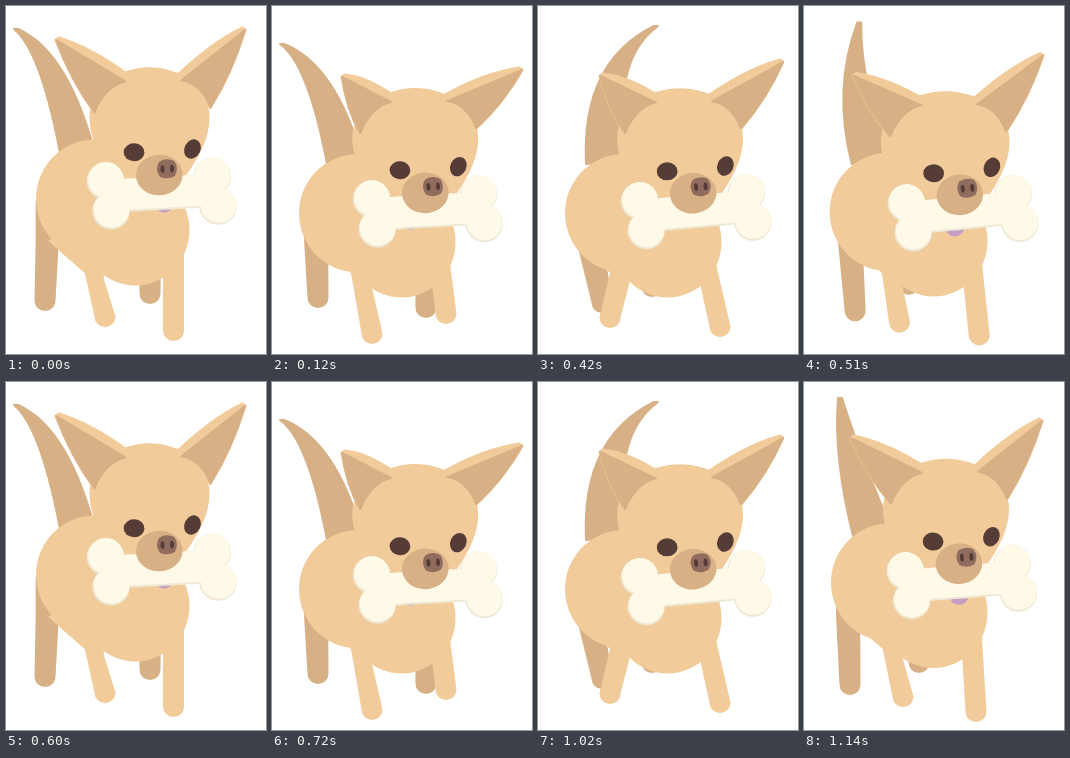
An HTML page with a canvas for the animation above (1.17 s loop, 260 by 348 pixels).

```html
<!DOCTYPE html>
<html>
<head>
<meta charset="utf-8">
<style>
  html, body { margin: 0; width: 100%; height: 100%; overflow: hidden; background: #fff; }
  canvas { display: block; }
</style>
</head>
<body>
<canvas id="stage" width="260" height="348"></canvas>
<script>
const ctx = document.getElementById('stage').getContext('2d');
const FUR = '#f1cb99', SHADE = '#d7b086', BONE = '#fff9e7', EDGE = '#efe9d7',
  EYE = '#553c37', NOSE = '#8f6c5d', TAG = '#c49fc2';
const LOOP = 1170, STEP = 30, STRIDE = 600;

// Key poses sit at these parts of a stride; a smooth periodic curve joins them.
const KEYS = [0, 0.2, 0.4, 0.7, 0.9];
let weights = [];
const setPhase = p => {
  weights = KEYS.map((a, i) => KEYS.reduce((w, b, j) =>
    i === j ? w : w * Math.sin(Math.PI * (p - b)) / Math.sin(Math.PI * (a - b)), 1));
};
const pose = (...values) => values.reduce((sum, v, i) => sum + v * weights[i], 0);

function shape(color, d, line = 0) {
  const path = new Path2D(d);
  ctx.fillStyle = ctx.strokeStyle = color;
  ctx.fill(path);
  if (line) {
    ctx.lineWidth = line;
    ctx.lineJoin = 'round';
    ctx.stroke(path);
  }
}

function oval(color, x, y, rx, ry = rx, turn = 0) {
  ctx.fillStyle = color;
  ctx.beginPath();
  ctx.ellipse(x, y, rx, ry, turn, 0, 2 * Math.PI);
  ctx.fill();
}

// Rounded foot from its left side to its right side, y being the sole.
const foot = (x, y, r = 10.5) => `${x - r} ${y - r}A${r} ${r} 0 0 0 ${x + r} ${y - r}`;

function tail() {
  const x = pose(10, 10, 80, 118, 36), y = pose(23, 38, 7, 20, 16);
  const cx = pose(49, 49, 51, 56, 42), cy = pose(46, 58, 84, 56, 76);
  const base = pose(56, 55, 47, 48, 50);
  shape(SHADE, `M${base} 158Q${cx - 13} ${cy} ${x - 2} ${y}L${x + 2} ${y}Q${cx + 15} ${cy} 91 155Z`, 2);
}

function backLegs() {
  const lx = pose(39, 46, 61, 64, 46), ly = pose(305, 302, 297, 307, 313);
  const hip = 16 + 0.35 * lx;
  shape(SHADE, `M${hip} 195V235L${foot(lx, ly)}L${hip + 24} 220Z`);
  const rx = pose(144, 154, 138, 114, 115), ry = pose(298, 312, 314, 291, 291);
  shape(SHADE, `M${rx - 11} 235L${foot(rx, ry)}L${rx + 11} 235Z`);
}

function body() {
  const y = pose(-6, 6, 0, 6, 0.5), x = pose(3, 0, 0, 0, 0);
  oval(FUR, 85 + x, 200 + y * 1.2, 58, 59);
  oval(FUR, 129.5, 230 + y, 54, 55.5);
}

function frontLegs() {
  const lx = pose(99, 100, 87, 72, 99), ly = pose(321, 338, 343, 322, 325);
  shape(FUR, `M42 235L${54 + lx / 4} 267L${foot(lx, ly)}L${78 + lx / 5} 273V200Z`);
  const rx = pose(167.5, 174, 182, 182, 172), ry = pose(335, 318, 322, 331, 340);
  shape(FUR, `M157 255L${foot(rx, ry)}L178 258V230Z`);
}

function ear(side, tx, ty, ax, ay, bx, by) {
  const outer = `M${bx} ${by}Q${(bx + tx) / 2 + side * 4} ${(by + ty) / 2 + 6} ${tx} ${ty + 3}`;
  shape(FUR, `${outer}L${tx - side * 3} ${ty + 1}Q${(ax + tx) / 2} ${(ay + ty) / 2 - 8} ${ax} ${ay}Z`, 3);
  shape(SHADE, `${outer}L${ax + side * 4} ${ay + 5}Q${(ax + bx) / 2 + side * 7} ${(ay + by) / 2 - 8} ${bx} ${by}Z`, 2);
}

function head(faceY) {
  const x = pose(143.5, 143.2, 146, 142, 142), ry = pose(57, 54, 54, 54, 54);
  const y = faceY - 26.2, top = y - ry, rx = 117 - ry, wide = top + 50;
  shape(FUR, `M${x - rx} ${wide}A${rx} 50 0 0 1 ${x + rx} ${wide}
    c0 28 -19 52 -33 72H${x - 28}C${x - 42} ${wide + 52} ${x - rx} ${wide + 28} ${x - rx} ${wide}`);
  ear(-1, pose(50, 70, 74, 62, 47), pose(31, 68, 60, 67, 53), x - 20, top + 9, x - 55, top + 45);
  ear(1, pose(239, 250, 254, 245, 238), pose(21, 61, 64, 53, 36), x + 28, top + 8, x + 61, top + 40);
}

function bone(color, x, y, grow = 0) {
  ctx.fillStyle = color;
  ctx.fillRect(x - 50, y - 15.5 - grow, 100, 31 + 2 * grow);
  for (const [dx, dy] of [[-55.5, -15.5], [-51.5, 14.5], [51.5, -14.5], [55.5, 15.5]])
    oval(color, x + dx, y + dy, 17.8 + grow);
}

function draw(t) {
  setPhase(t % STRIDE / STRIDE);
  ctx.clearRect(0, 0, 260, 348);
  const faceX = pose(157.5, 157.4, 155, 158.5, 158.5);
  const faceY = pose(144.5, 162.3, 156.5, 162.5, 157);
  const tilt = pose(-3, -3.3, 1, -5, -4.5) * Math.PI / 180;
  const open = Math.min(1, Math.max(0.5, Math.abs(t - 240) / 100));

  tail();
  backLegs();
  body();
  frontLegs();
  oval(TAG, pose(158, 138, 135, 141, 155), pose(197, 214, 214, 214, 213.5), 9.5);
  head(faceY);

  ctx.save();
  ctx.translate(faceX, faceY);
  ctx.rotate(tilt);
  bone(EDGE, -4, 42.8, 1);
  bone(BONE, -3.5, 41.8);
  oval(SHADE, -5.5, 24.3, 23.3, 20.3);
  shape(NOSE, 'M-5 11Q2.5 7 10 11Q15 18 10 26Q2.5 30-5 26Q-10 18-5 11Z');
  oval(EYE, -2, 18.5, 2, 3.8);
  oval(EYE, 7.5, 18.5, 2, 3.8);
  oval(EYE, -29.5, 0.3, 10.4, 9 * open, 0.1);
  if (open < 1) oval(EYE, 29.5, 0, 9.2, 9 * open);
  else oval(EYE, 29, 0, 8, 10, 0.5);
  ctx.restore();
}

function frame(now) {
  draw(Math.floor(now % LOOP / STEP) * STEP);
  requestAnimationFrame(frame);
}
frame(0);
</script>
</body>
</html>
```
